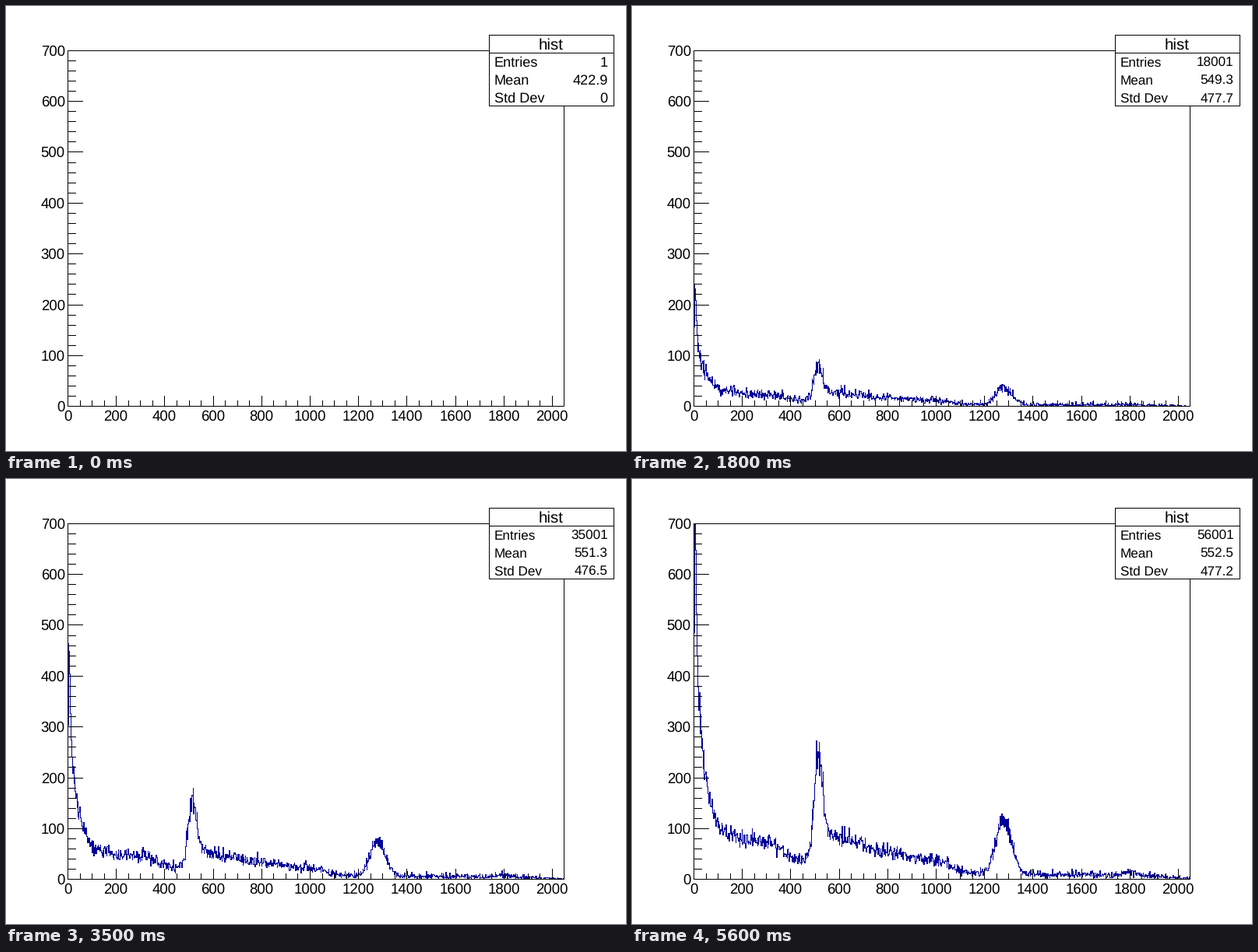
Animation of 796 by 572 pixels, one loop 5.7 s. Source, as a matplotlib script:

```python
import numpy as np
import matplotlib.pyplot as plt
from matplotlib.animation import FuncAnimation
from matplotlib.patches import Rectangle

W, H, DPI = 796, 572, 100
FRAMES, INTERVAL = 57, 100
X_MAX, Y_MAX = 2048, 700
BINS = 1024
BLUE = (0, 0, 0.6)

plt.rcParams["font.family"] = "Liberation Sans"
plt.rcParams["text.hinting"] = "none"
plt.rcParams["path.simplify"] = False


def px(v):
    return np.floor(0.1 * W + np.asarray(v) * 0.8 * W / X_MAX) + 0.5


def py(v):
    return np.floor(0.9 * H - np.asarray(v) * 0.8 * H / Y_MAX) + 0.5


def gauss(x, mean, sigma):
    return np.exp(-0.5 * ((x - mean) / sigma) ** 2)


def rise(x, centre, width):
    return 1 / (1 + np.exp((centre - x) / width))


def spectrum(x):
    """Expected counts per bin after the last step."""
    noise = 580 * np.exp(-x / 6) + 476 * np.exp(-x / 33)
    shelf = 24 + (56 - 0.06 * x) * rise(-x, -375, 22)
    slope = 81 * np.exp((560 - x) / 380) * rise(-x, -1085, 22)
    upper = rise(x, 525, 10)
    background = 2 + 10 * (1 - (x / X_MAX) ** 6)
    peaks = (185 * gauss(x, 512, 17.5) + 110 * gauss(x, 1279, 31)
             + 6 * gauss(x, 1805, 35))
    total = noise + shelf * (1 - upper) + slope * upper + background + peaks
    return total * (1 - np.exp(-x / 1.6))


edges = np.linspace(0, X_MAX, BINS + 1)
rate = spectrum((edges[:-1] + edges[1:]) / 2) / (FRAMES - 1)

# Each step adds one batch of events; the steep leading edge grows evenly.
rng = np.random.default_rng(7)
batches = rng.poisson(rate, (FRAMES, BINS))
batches[0] = 0
counts = batches.cumsum(axis=0)
counts[:, :8] = np.outer(np.arange(FRAMES), rate[:8])

# Key points of the running statistics.
STEPS = [1, 9, 18, 26, 35, 42, 56]
MEANS = [541, 545, 549.3, 549.7, 551.3, 552.1, 552.5]
STDS = [471, 474.1, 477.7, 476, 476.5, 476.7, 477.2]

fig = plt.figure(figsize=(W / DPI, H / DPI), dpi=DPI, facecolor="white")
ax = fig.add_axes([0, 0, 1, 1])
ax.set_xlim(0, W)
ax.set_ylim(H, 0)
ax.axis("off")


def line(xs, ys, color="black", z=3):
    return ax.plot(xs, ys, color=color, lw=72 / DPI, antialiased=False,
                   snap=False, zorder=z, solid_capstyle="projecting",
                   solid_joinstyle="miter")[0]


def label(x, y, s, size, ha="left", z=4):
    return ax.text(x, y, s, fontsize=size * 72 / DPI, ha=ha, va="baseline",
                   color="black", zorder=z)


def draw_axes():
    left, right = px(0), px(X_MAX)
    top, bottom = py(Y_MAX), py(0)
    line([left, right, right, left, left], [top, top, bottom, bottom, top])
    for v in range(0, X_MAX, 50):
        major = v % 200 == 0
        line([px(v)] * 2, [bottom, bottom - (13 if major else 7)])
        if major:
            label(px(v) - 0.5, 533, str(v), 18.7, "center")
    for v in range(0, Y_MAX + 1, 20):
        major = v % 100 == 0
        line([left, left + (19 if major else 10)], [py(v)] * 2)
        if major:
            label(75.8, py(v) + 6.5, str(v), 18.7, "right")


def draw_stats_box():
    ax.add_patch(Rectangle((620, 37), 161, 92, fc="white", ec="none",
                           antialiased=False, zorder=5))
    line([620.5, 780.5, 780.5, 620.5, 620.5],
         [37.5, 37.5, 128.5, 128.5, 37.5], z=6)
    line([620.5, 780.5], [60.5, 60.5], z=6)
    label(699.5, 56, "hist", 20.5, "center", z=7)


draw_axes()
draw_stats_box()
curve = line([], [], BLUE, z=2)
rows = [(label(627, y, name, 17.1, z=7), label(772.5, y, "", 17.1, "right", z=7))
        for name, y in (("Entries", 78), ("Mean", 101), ("Std Dev", 124))]

step_x = np.repeat(px(edges), 2)


def stats(i):
    if i == 0:
        return "1", "422.9", "0"
    mean = np.interp(i, STEPS, MEANS)
    std = np.interp(i, STEPS, STDS)
    return str(1000 * i + 1), f"{mean:.4g}", f"{std:.4g}"


def update(i):
    tops = np.repeat(py(np.minimum(counts[i], Y_MAX)), 2)
    curve.set_data(step_x, np.concatenate([[py(0)], tops, [py(0)]]))
    size = (17.1 if i else 18.2) * 72 / DPI
    for (name, value), s in zip(rows, stats(i)):
        name.set_fontsize(size)
        value.set_fontsize(size)
        value.set_text(s)
    return [curve, *(t for row in rows for t in row)]


anim = FuncAnimation(fig, update, frames=FRAMES, interval=INTERVAL,
                     repeat=True, repeat_delay=0)
plt.show()
```
